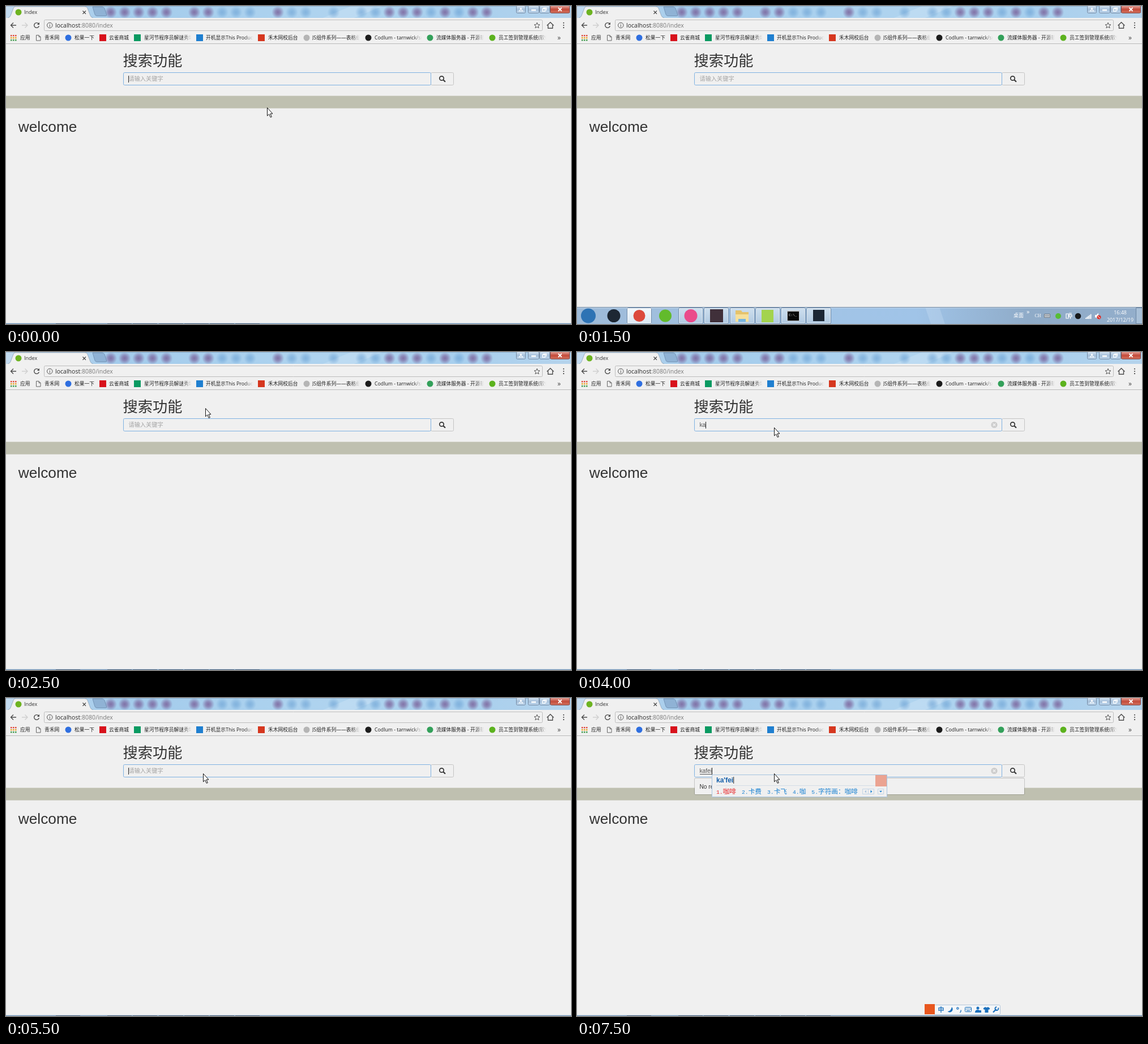
Animation of 998x561 px, one loop 8 s. Source, as an HTML page with a canvas:

```html
<!DOCTYPE html>
<html lang="zh-CN">
<head>
<meta charset="utf-8">
<title>Index</title>
<style>
html, body { margin: 0; width: 100%; height: 100%; overflow: hidden; background: #f0f0f0; }
canvas { display: block; }
</style>
</head>
<body>
<canvas id="stage" width="998" height="561"></canvas>
<script>
const ctx = document.getElementById('stage').getContext('2d');
const STEP = 500, LOOP = 8000;
const BG = '#f0f0f0', INK = '#333';
const CJK = '"Noto Sans CJK SC", "Noto Sans CJK", sans-serif';
const UI = '"Open Sans", ' + CJK;
const ARIAL = '"Liberation Sans", ' + CJK;
const MONO = '"Liberation Mono", monospace';

// Drawing helpers
function box(x, y, w, h, color) {
  ctx.fillStyle = color;
  ctx.fillRect(x, y, w, h);
}
function frame(x, y, w, h, color, r = 0) {
  ctx.strokeStyle = color;
  ctx.lineWidth = 1;
  ctx.beginPath();
  ctx.roundRect(x + .5, y + .5, w - 1, h - 1, r);
  ctx.stroke();
}
function disc(x, y, r, color) {
  ctx.fillStyle = color;
  ctx.beginPath();
  ctx.arc(x, y, r, 0, Math.PI * 2);
  ctx.fill();
}
function shape(d, color) {
  ctx.fillStyle = color;
  ctx.fill(new Path2D(d));
}
function line(d, color, width = 1) {
  ctx.strokeStyle = color;
  ctx.lineWidth = width;
  ctx.stroke(new Path2D(d));
}
function text(s, x, y, size, color = INK, family = UI, opt = {}) {
  ctx.font = (opt.weight || 400) + ' ' + size + 'px ' + family;
  ctx.textAlign = opt.align || 'left';
  ctx.fillStyle = color;
  ctx.fillText(s, x, y);
}
function ramp(x0, y0, x1, y1, ...colors) {
  const g = ctx.createLinearGradient(x0, y0, x1, y1);
  colors.forEach((c, i) => g.addColorStop(i / (colors.length - 1), c));
  return g;
}
function at(x, y, draw) {
  ctx.save();
  ctx.translate(x, y);
  draw();
  ctx.restore();
}

function blob(x, rgb, alpha) {
  const g = ctx.createRadialGradient(x, 11, 0, x, 11, 11);
  g.addColorStop(0, `rgba(${rgb},${alpha})`);
  g.addColorStop(.4, `rgba(${rgb},${alpha * .75})`);
  g.addColorStop(1, `rgba(${rgb},0)`);
  box(x - 11, 0, 22, 21, g);
}

function titleBar() {
  box(0, 0, 998, 21, ramp(0, 0, 998, 0, '#c3dbf0', '#a3cbeb', '#a9d0ee', '#b0d4ef', '#a7cfee', '#b5d3ec'));
  shape('M560 21L610 0H665L615 21Z', 'rgba(225,240,252,.25)');
  const kinds = 'ppppp.ppbbb.pbb.b.bbpppbpbpp';
  [...kinds].forEach((k, i) => {
    const x = 185 + i * 24.6;
    if (k === 'p') blob(x, '116,84,144', .75);
    if (k === 'b') blob(x, '92,150,205', .5);
  });
  box(0, 0, 998, 1, 'rgba(90,115,145,.35)');

  const plus = 'M153 1.5H170Q173 2 174 4L177.5 15Q178 17.5 176 17.5H161Q158 17.5 157 15Z';
  shape(plus, '#8fb2d5');
  line(plus, '#6d8cae', .8);
  shape('M3 21Q7 20 8 17L13 4Q14 1 17 1H139Q143 1 144 4L149 17Q150 20 154 21Z', BG);
  line('M3 21Q7 20 8 17L13 4Q14 1 17 1H139Q143 1 144 4L149 17Q150 20 154 21', '#8fa3b8', .8);
  disc(22, 11, 5.5, '#6db321');
  text('Index', 32, 14, 9);
  line('M135.5 8.5L141 14M141 8.5L135.5 14', '#444', 1.1);

  const glass = ramp(0, 0, 0, 12, '#d3e4f4', '#a6c0da', '#bcd5ec');
  for (const [x, w] of [[901, 17], [922, 20], [942, 19]]) {
    box(x, 0, w, 12, glass);
    frame(x, -1, w, 14, '#758ba4', 2);
  }
  box(961, 0, 35, 12, ramp(0, 0, 0, 12, '#e4a39a', '#c34a3a', '#d2705c'));
  frame(961, -1, 35, 14, '#7b4a4c', 2);
  disc(909.5, 4.5, 1.6, '#fff');
  line('M906 9Q909.5 4 913 9Z', '#fff', 1.2);
  box(928, 6, 8, 2.5, '#fff');
  line('M949 3.5H954.5V8M947.5 5H952.5V9H947.5Z', '#fff', 1.3);
  line('M975.5 3L981.5 9M981.5 3L975.5 9', '#fff', 1.8);
}

function toolBar() {
  box(0, 21, 998, 46, BG);
  line('M18 34H9M13 29.5L8.5 34L13 38.5', '#4c4c4c', 1.4);
  line('M28 34H37M33.5 29.5L38 34L33.5 38.5', '#cfcfcf', 1.4);
  line('M57.5 31.2A4.4 4.4 0 1 0 58.3 35.3', '#4c4c4c', 1.4);
  shape('M59 28.8V33H54.8Z', '#4c4c4c');
  frame(67, 24, 881, 20, '#bdbdbd', 2);
  line('M82 34A4.7 4.7 0 1 1 72.6 34A4.7 4.7 0 1 1 82 34M77.3 33.2V37M77.3 31V32.2', '#555', 1);
  text('localhost', 87, 38, 10.55, '#2b2b2b');
  text(':8080/index', 131.2, 38, 10.55, '#7b7b7b');
  line('M938 29.3L939.4 32.7L943 33L940.2 35.3L941.1 38.8L938 36.9L934.9 38.8L935.8 35.3L933 33L936.6 32.7Z', '#555', 1);
  line('M955.5 34.5L961.5 28.8L967.5 34.5M957.5 33.5V39.3H965.5V33.5', '#4c4c4c', 1.4);
  [29.8, 34, 38.2].forEach(y => disc(985, y, 1.1, '#4c4c4c'));
}

// x, label, icon colour, icon kind, icon centre
const marks = [
  [25, '应用', '', 'grid', 13],
  [68, '青禾网', '', 'page', 57],
  [121, '松果一下', '#2f6fe0', 'disc', 110],
  [182, '云雀商城', '#d8121c', 'square', 171],
  [244, '星河节程序员解谜秀场', '#0a9a61', 'square', 232],
  [353, '开机显示This Product Key', '#1f7fd0', 'square', 342],
  [463, '禾木网校后台', '#d6371f', 'square', 451],
  [541, 'JS组件系列——表格组件', '#b5b5b5', 'disc', 531],
  [651, 'Codlum - tarnwick/srv', '#1c1c1c', 'disc', 640],
  [760, '流媒体服务器 - 开源软件', '#33a05a', 'disc', 749],
  [870, '员工签到管理系统(软件)', '#5cb21e', 'disc', 859]
];

function bookmarks() {
  for (const [x, label, color, kind, cx] of marks) {
    if (kind === 'disc') disc(cx, 56, 5.5, color);
    if (kind === 'square') box(cx - 6, 50, 12, 12, color);
    if (kind === 'page') line('M53.5 51.5H58L61 54.5V61H53.5ZM58 51.5V54.5H61', '#666', 1);
    if (kind === 'grid') {
      const hues = ['#e0493c', '#e9a325', '#3f9b4f'];
      for (let i = 0; i < 9; i++) box(8 + i % 3 * 4, 51 + (i / 3 | 0) * 4, 2.5, 2.5, hues[i / 3 | 0]);
    }
    ctx.save();
    ctx.beginPath();
    ctx.rect(x, 48, 84, 16);
    ctx.clip();
    text(label, x, 59.2, 8.77, ramp(x + 68, 0, x + 84, 0, '#1f1f1f', 'rgba(31,31,31,0)'));
    ctx.restore();
  }
  text('»', 974, 59.5, 12, '#444');
  box(0, 66, 998, 1, '#b9b9b9');
}

function page() {
  box(0, 67, 998, 494, BG);
  text('搜索功能', 206.5, 105.5, 26.25, INK, CJK);
  box(0, 158.5, 998, 22, '#bfc0b0');
  text('welcome', 21.8, 222, 26.25, INK, ARIAL);
  frame(750, 117, 41, 23, '#c4c4c4', 2);
  frame(207, 117, 544, 23, '#7fb2e2', 2);
  line('M773.2 127.5A3.7 3.7 0 1 1 765.8 127.5A3.7 3.7 0 1 1 773.2 127.5', INK, 1.7);
  line('M772.3 130.3L776 133.8', INK, 2.2);
}

const textEnd = s => {
  ctx.font = '10.2px ' + ARIAL;
  return Math.floor(216.5 + ctx.measureText(s).width);
};

function field(s) {
  if (s.query) {
    text(s.query, 216.5, 132, 10.2, '#555', ARIAL);
    disc(737, 128.5, 5.6, '#ccc');
    line('M734.7 126.2L739.3 130.8M739.3 126.2L734.7 130.8', BG, 1.5);
  } else {
    text('请输入关键字', 216.5, 132.4, 10.2, '#a3a3a3', CJK);
  }
  const end = s.query ? textEnd(s.query) : 216;
  if (s.spell) box(217, 134, end - 217, 1, '#555');
  if (s.caret) box(end, 123, 1, 12, '#222');
}

function noResult() {
  box(208, 142, 582, 28, BG);
  frame(207, 141, 584, 30, 'rgba(0,0,0,.18)', 2);
  text('No result for "kaf"', 216.5, 160, 10.2, INK, ARIAL);
}

function candidates(spell, left) {
  const blue = '#1b82d2', unit = 11.67;
  at(left, 135, () => {
    box(0, 0, 310, 40, BG);
    frame(0, 0, 310, 40, '#a5c3e0');
    text(spell, 8, 14, 12, '#1560ab', ARIAL, { weight: 700 });
    box(8 + ctx.measureText(spell).width, 4, 1, 12, '#222');
    box(8, 19, 280, 1, '#d3dde6');
    let x = 8;
    ['咖啡', '卡费', '卡飞', '咖', '字符画：咖啡'].forEach((word, i) => {
      const color = i ? blue : '#e8262a';
      text(i + 1 + '.', x, 34, unit / 1.2, color, MONO);
      text(word, x + unit, 34, unit, color, CJK);
      x += unit * (1 + word.length) + 10;
    });
    frame(266, 25, 11, 10, '#c3d5e6');
    frame(276, 25, 11, 10, '#c3d5e6');
    frame(293, 25, 11, 10, '#c3d5e6');
    shape('M273 27.5V32.5L270 30Z', '#a9c4dd');
    shape('M280.5 27.5V32.5L283.5 30ZM296 28.7H301L298.5 31.6Z', blue);
    box(289, 1, 20, 20, '#eba391');
  });
}

function imeBar() {
  const c = '#1b70bd';
  box(630, 541, 118, 18, '#f4f6f8');
  frame(630, 541, 118, 18, '#b3c6da', 2);
  box(614, 540, 18, 18, '#e8571f');
  text('中', 637.5, 554, 11, c, CJK, { weight: 700 });
  shape('M662 545A5.2 5.2 0 1 1 654.5 553Q660.5 552.5 662 545Z', c);
  line('M674 547.5A1.6 1.6 0 1 1 670.8 547.5A1.6 1.6 0 1 1 674 547.5M678 550.5Q679 552.5 676.5 555', c, 1.3);
  frame(685, 545, 12, 9, c, 1);
  [547, 549].forEach(y => { for (let x = 687; x < 696; x += 2) box(x, y, 1, 1, c); });
  box(688, 551, 6, 1, c);
  disc(708, 547, 2.5, c);
  shape('M703 555Q703 550 708 550Q710 550 711 551V555Z', c);
  box(709, 551, 5, 4, c);
  shape('M721 545L717.5 547.5L719 550L720.5 549.3V555H726.5V549.3L728 550L729.5 547.5L726 545Q723.5 547 721 545Z', c);
  line('M735 554.5L740.5 549', c, 2.4);
  line('M744 546.5A3 3 0 1 1 741.3 545', c, 1.8);
}

const slots = [88, 179, 224, 270, 315, 360, 405];

function hiddenBar() {
  box(0, 559, 998, 1, '#c5d2df');
  box(0, 560, 998, 1, '#6f93b8');
  slots.forEach(x => box(x, 560, 43, 1, '#465d77'));
}

function taskBar() {
  box(0, 531, 998, 30, ramp(0, 0, 998, 0, '#9dbad8', '#a2c1e0', '#a2c4e6', '#a0c4e8', '#8fabc8', '#93aecb'));
  shape('M615 531H640L650 561H625Z', 'rgba(215,232,248,.25)');
  box(0, 531, 998, 1, '#6b86a3');
  box(0, 532, 998, 1, '#c6d7e8');
  slots.forEach((x, i) => {
    box(x, 532, 44, 29, ramp(0, 532, 0, 561, i ? '#cfe0ef' : '#f3f8fc', i ? '#b0c9e1' : '#dbe8f3'));
    frame(x, 532, 44, 29, '#6d89a8', 2);
    frame(x + 1, 533, 42, 27, 'rgba(255,255,255,.55)', 2);
  });
  disc(20, 546.5, 13, '#2e73b4');
  disc(65, 546.5, 11.5, '#1d2733');
  disc(110, 546.5, 10.5, '#dc4a3d');
  disc(156, 546.5, 11, '#62bb2c');
  disc(201, 546.5, 11.5, '#ea4b8b');
  box(235, 535, 23, 23, '#40303a');
  shape('M280 537H290L292 540H303V557H280Z', '#e5c36c');
  shape('M280 544H303V557H280Z', '#f6e09b');
  box(285, 552, 13, 5, '#78b5df');
  box(326, 536, 21, 22, '#a3d34e');
  box(371, 537, 22, 19, '#c5c9cd');
  box(372, 539, 20, 16, '#080808');
  text('C:\\_', 374, 547, 6, '#eee', MONO);
  box(417, 536, 20, 20, '#1c2735');

  text('桌面', 771, 549, 9, '#fff', CJK);
  text('»', 794, 543, 11, '#fff');
  text('CH', 808.5, 549, 8, '#fff', '"Liberation Serif", serif');
  box(825, 543, 11, 7, '#d8dde2');
  frame(825, 543, 11, 7, '#6f7780');
  for (let x = 827; x < 834; x += 2) box(x, 545, 1, 3, '#6f7780');
  disc(850, 547, 5, '#57bd35');
  line('M864 543H868V551H864ZM870 541V545M872.5 541V545M869 545H874V548H869ZM871.5 548V552', '#fff', 1.2);
  disc(885, 547, 5.3, '#17191c');
  for (let i = 0; i < 5; i++) box(898 + i * 2.2, 550 - i * 1.6, 1.6, 2 + i * 1.6, '#fff');
  shape('M915 545H917.5L921 541.5V553L917.5 549.5H915Z', '#fff');
  disc(922, 549, 3.6, '#d9302c');
  line('M920 547L924 551', '#fff', 1);
  text('16:48', 959.5, 543.5, 8.9, '#fff', UI, { align: 'center' });
  text('2017/12/19', 959.5, 556.5, 8.9, '#fff', UI, { align: 'center' });
  box(987, 532, 11, 29, 'rgba(205,224,240,.35)');
  frame(987, 532, 12, 29, '#6c86a2');
}

function pointer([x, y]) {
  at(x, y, () => {
    const d = 'M.5 .5V14.8L3.7 11.8L6.2 17.4L8.3 16.5L5.9 11H10Z';
    shape(d, '#fff');
    line(d, '#111', 1);
  });
}

// Everything that changes, as a function of the half-second step
const carets = '1010101011010111';
const queries = { 8: 'ka', 9: 'kaf', 10: 'ka', 14: 'kaf', 15: 'kafei' };
const spells = { 14: "ka'f", 15: "ka'fei" };

function pointerAt(i) {
  if (i === 0) return [461, 179];
  if (i < 4) return null;
  if (i === 4) return [396, 536];
  return i === 5 ? [352, 99] : [348, 133];
}

function stateAt(i) {
  return {
    caret: carets[i] === '1',
    query: queries[i] || '',
    spell: spells[i],
    popup: i === 9 || i === 10 || i === 15,
    taskbar: i === 3 || i === 4,
    ime: i >= 12,
    pointer: pointerAt(i)
  };
}

function draw(s) {
  ctx.clearRect(0, 0, 998, 561);
  titleBar();
  toolBar();
  bookmarks();
  page();
  field(s);
  if (s.popup) noResult();
  s.taskbar ? taskBar() : hiddenBar();
  if (s.ime) imeBar();
  if (s.spell) candidates(s.spell, textEnd(s.query));
  if (s.pointer) pointer(s.pointer);
}

const start = performance.now();
function tick() {
  const t = (performance.now() - start) % LOOP;
  draw(stateAt(Math.floor(t / STEP)));
  requestAnimationFrame(tick);
}
tick();
</script>
</body>
</html>
```
